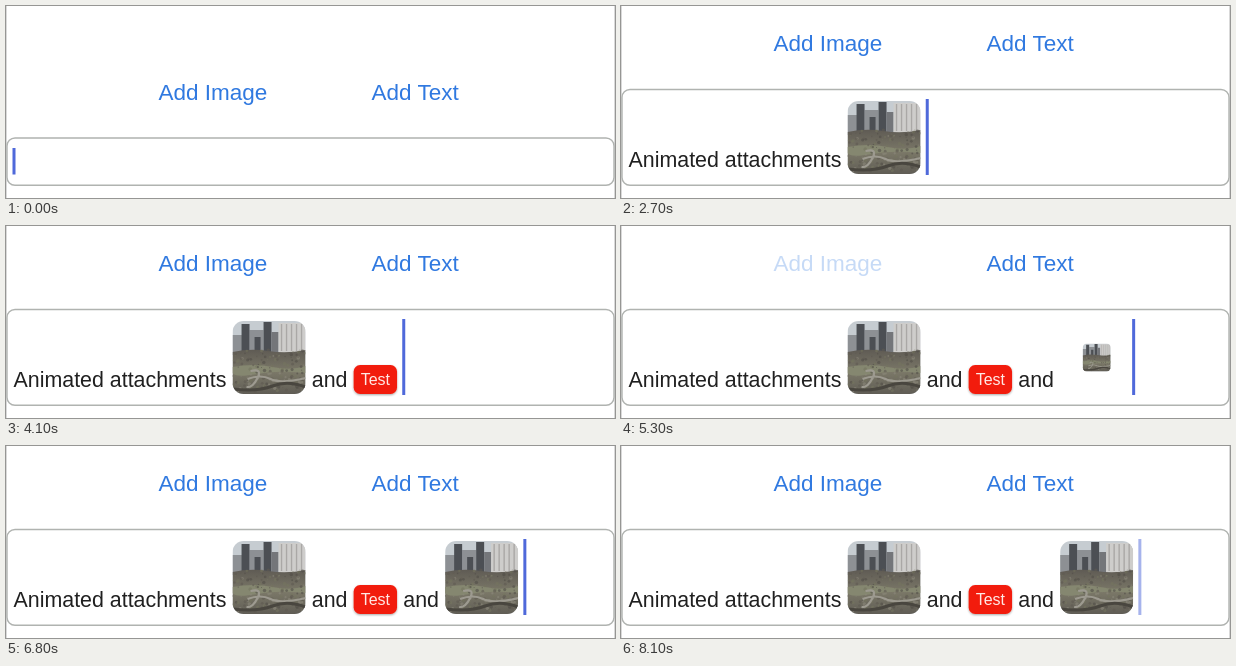
Write an HTML page that moves like this. It is 609 by 192 pixels and loops after 8200 ms.

```html
<!DOCTYPE html>
<html lang="en">
<head>
<meta charset="utf-8">
<title>Animated attachments</title>
<style>
  html, body { margin: 0; width: 100%; height: 100%; overflow: hidden; background: #fff; }
  svg { display: block; font-family: "Liberation Sans", Arial, sans-serif; }
  .button { font-size: 22.5px; fill: #3079e0; }
  .word { font-size: 21.4px; fill: #202020; }
</style>
</head>
<body>
<svg width="609" height="192" viewBox="0 0 609 192">
  <defs>
    <clipPath id="round"><rect width="73" height="73" rx="11"/></clipPath>
    <linearGradient id="ground" x1="0" y1="0" x2="0" y2="1">
      <stop offset="0" stop-color="#5f5b54"/>
      <stop offset=".5" stop-color="#7b7868"/>
      <stop offset="1" stop-color="#605d55"/>
    </linearGradient>
    <filter id="soft" x="-20%" y="-20%" width="140%" height="150%">
      <feDropShadow dx="0" dy="1" stdDeviation="1.2" flood-opacity=".35"/>
    </filter>
    <g id="photo" clip-path="url(#round)">
      <rect width="73" height="73" fill="#c6ccd1"/>
      <path d="M0 14H10V34H0Z M17 9H31V34H17Z" fill="#8d9094"/>
      <path d="M9 3H17V34H9Z M31 1H39V34H31Z M22 16H28V34H22Z" fill="#4c4f54"/>
      <path d="M39 11H46V34H39Z" fill="#74767a"/>
      <path d="M46 2H73V34H46Z" fill="#cecdcb"/>
      <path d="M49 3V30M54 3V30M59 3V30M64 3V30M69 3V30" stroke="#aaa8a6" stroke-width="1.4"/>
      <path d="M0 31Q18 27 36 30T73 29V73H0Z" fill="url(#ground)"/>
      <path d="M0 46Q22 42 40 46T73 45V52Q45 49 24 53T0 52Z" fill="#858770"/>
      <g id="specks"></g>
      <path d="M18 50Q30 47 25 57T14 66M15 58Q28 53 38 58T73 57" fill="none" stroke="#9d9a90" stroke-width="2.2"/>
      <path d="M0 68Q25 71 40 65T73 66" fill="none" stroke="#49463f" stroke-width="3"/>
    </g>
  </defs>

  <path d="M.5 0V192M608.5 0V192" stroke="#d9d9d9"/>
  <g id="buttons">
    <text id="addImage" class="button" x="152.5" y="93.5">Add Image</text>
    <text id="addText" class="button" x="365.5" y="93.5">Add Text</text>
  </g>
  <rect id="field" x="1" width="607" rx="8" fill="#fff" stroke="#b0b3b0" stroke-width="1.4"/>
  <text id="title" class="word">Animated attachments</text>
  <text id="and1" class="word">and</text>
  <text id="and2" class="word">and</text>
  <g id="label">
    <rect x="-21.7" y="-14.5" width="43.4" height="29" rx="6.5" fill="#f21d0b" filter="url(#soft)"/>
    <text y="5.7" font-size="16" fill="#ffe9e5" text-anchor="middle">Test</text>
  </g>
  <use id="photo1" href="#photo" x="-36.5" y="-36.5"/>
  <use id="photo2" href="#photo" x="-36.5" y="-36.5"/>
  <rect id="caret" width="3" fill="#4f69da"/>
</svg>
<script>
const LOOP = 8200, STEP = 100, SPIN = 500, TAP = 200, BLINK = 500;
const MARGIN = 7.5, GAP = 6.2, BASELINE = 161;
const $ = id => document.getElementById(id);
const set = (el, attrs) => { for (const k in attrs) el.setAttribute(k, attrs[k]); };
const clamp = v => Math.min(1, Math.max(0, v));

// What enters the line, in order; attachments grow in and later spin once.
const items = [
  { id: "title", born: 600, grow: 100 },
  { id: "photo1", born: 2100, grow: 200, size: 73, spin: 6212, button: "addImage", tap: 1900 },
  { id: "and1", born: 3300, grow: 100 },
  { id: "label", born: 3900, grow: 200, size: 43.4, spin: 6900, button: "addText", tap: 3900 },
  { id: "and2", born: 4700, grow: 100 },
  { id: "photo2", born: 5300, grow: 300, size: 73, spin: 7500, button: "addImage", tap: 5300 }
];
const tallFrom = items[1].born;

let pen = MARGIN;
for (const item of items) {
  item.x = pen;
  item.end = pen + (item.size || $(item.id).getComputedTextLength());
  item.y = item.id === "label" ? 153.5 : 131.5;
  pen = item.end + GAP;
}

// Mottled trees and grass
let seed = 7;
const random = () => (seed = seed * 16807 % 2147483647) / 2147483647;
const shades = ["#524f48", "#8d897c", "#75755f", "#5f5a53"];
for (let i = 0; i < 160; i++) {
  const speck = document.createElementNS("http://www.w3.org/2000/svg", "circle");
  set(speck, { cx: random() * 73, cy: 29 + random() * 42, r: .5 + random() * 1.3,
    fill: shades[i % 4], opacity: .6 });
  $("specks").append(speck);
}

function drawItem({ id, x, y, end, born, grow, size, spin }, t) {
  let transform = `translate(${x} ${t < tallFrom ? BASELINE + 2 : BASELINE})`;
  if (size) {
    const scale = Math.sin(clamp((t - born + STEP) / (grow + STEP)) * Math.PI / 2);
    const angle = clamp((t - spin) / SPIN) * 360;
    transform = `translate(${(x + end) / 2} ${y}) rotate(${angle}) scale(${scale})`;
  }
  set($(id), { transform, visibility: t >= born ? "visible" : "hidden" });
}

// The caret follows the newest item, stays lit while that settles, then blinks.
function drawCaret(t, tall) {
  const last = items.findLast(({ born }) => born <= t) || { end: MARGIN - GAP, born: t, grow: 0 };
  const idle = Math.max(BLINK / 2, t - last.born - last.grow);
  const gap = last.size && t === last.born ? 0 : GAP;
  set($("caret"), {
    x: last.end + gap - 1, y: tall ? 93 : 142, height: tall ? 76 : 26.5,
    opacity: clamp(.5 + .9 * Math.sin(Math.PI * idle / BLINK))
  });
}

function draw(t) {
  const tall = t >= tallFrom;
  const top = tall ? 83.5 : 132;
  set($("buttons"), { transform: `translate(0 ${tall ? -48.5 : 0})` });
  set($("field"), { y: top, height: 179.3 - top });
  for (const id of ["addImage", "addText"]) {
    const pressed = items.some(({ button, tap }) => button === id && t >= tap && t < tap + TAP);
    set($(id), { opacity: pressed ? .27 : 1 });
  }
  for (const item of items) drawItem(item, t);
  drawCaret(t, tall);
}

const start = performance.now();
function tick() {
  const t = (performance.now() - start) % LOOP;
  draw(Math.floor(t / STEP) * STEP);
  requestAnimationFrame(tick);
}
tick();
</script>
</body>
</html>
```
